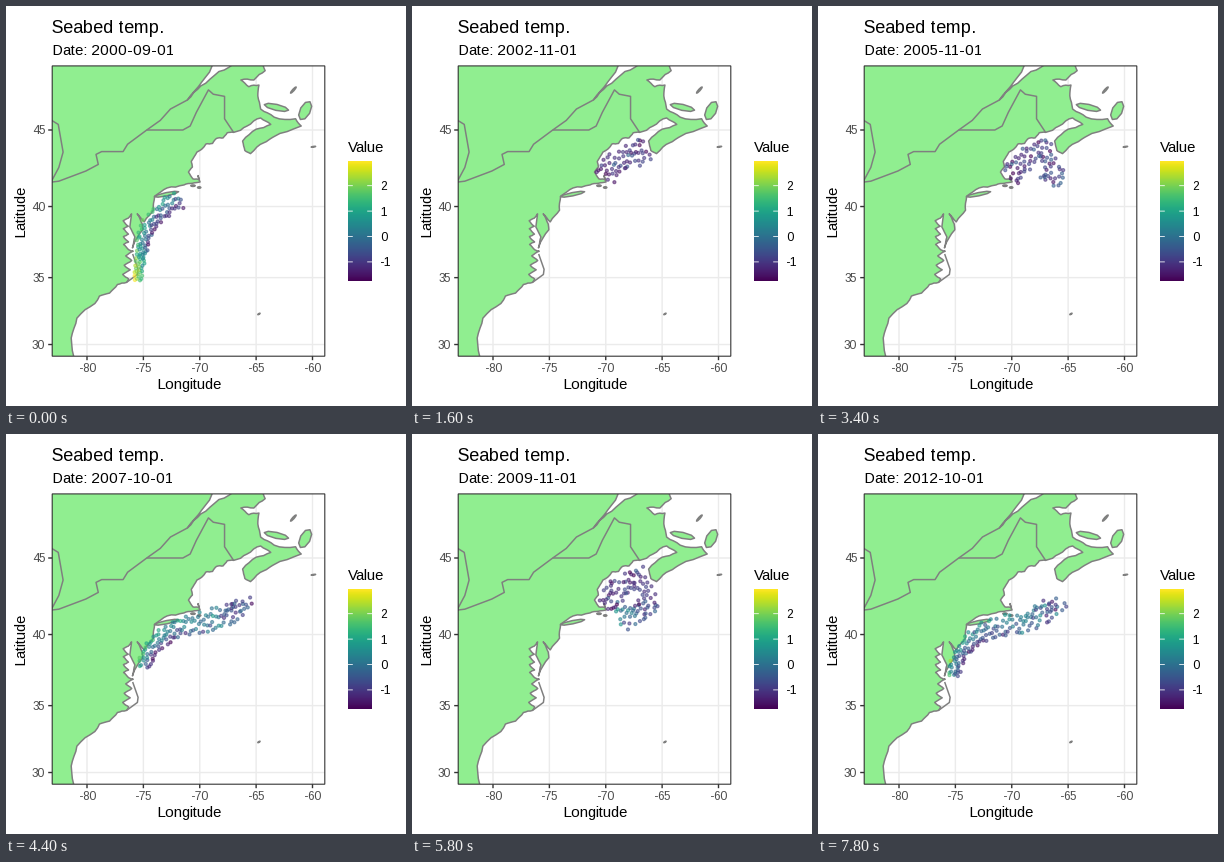
These frames come from a looping animation (400x400 px, 8000 ms). A matplotlib script:

```python
import math

import matplotlib.pyplot as plt
import numpy as np
from matplotlib.animation import FuncAnimation
from matplotlib.patches import Polygon, Rectangle

SIZE, DPI = 400, 100
PX = 72 / DPI                      # one pixel in points
LEFT, TOP, RIGHT, BOTTOM = 46.2, 59.9, 318.8, 350.2
SCALE = 11.275                     # pixels per degree of longitude
V_MIN, V_MAX = -1.75, 2.98
GREY = "#7f7f7f"

# Whole-pixel letter advances
plt.rcParams.update({"font.family": "Liberation Sans",
                     "text.hinting_factor": 1})
viridis = plt.get_cmap("viridis")


# ---------------------------------------------------------------- geometry
def merc(lat):
    return math.degrees(math.log(math.tan(math.pi / 4 + math.radians(lat) / 2)))


def project(points):
    return [(81 + (lon + 80) * SCALE, 124 - (merc(lat) - merc(45)) * SCALE)
            for lon, lat in points]


def inlets(start, end, n, dx, dy):
    """Shore from start to end with n bays cut in by (dx, dy)."""
    t = np.linspace(0, 1, 2 * n + 1)[:, None]
    shore = np.array(start) * (1 - t) + np.array(end) * t
    shore[1::2] += (dx, dy)
    return [tuple(p) for p in shore]


def rough(points, amount=0.06, passes=2):
    """Shift segment midpoints sideways for a natural shoreline."""
    rng = np.random.default_rng(4)
    for _ in range(passes):
        out = [points[0]]
        for (x0, y0), (x1, y1) in zip(points, points[1:]):
            k = rng.uniform(-amount, amount)
            out.append(((x0 + x1) / 2 - k * (y1 - y0),
                        (y0 + y1) / 2 + k * (x1 - x0)))
            out.append((x1, y1))
        points = out
    return points


def island(lon, lat, length, width, tilt):
    """Tapered island, tilted counter-clockwise in degrees."""
    a = np.linspace(0, 2 * math.pi, 9)[:-1]
    u, v = length / 2 * np.cos(a), width / 2 * np.sin(a)
    c, s = math.cos(math.radians(tilt)), math.sin(math.radians(tilt))
    return list(zip(lon + u * c - v * s, lat + (u * s + v * c) * 0.74))


coast = rough(
    [(-81, 28.6), (-81.4, 30.5), (-80.9, 32), (-79.3, 33.1), (-78.9, 33.65),
     (-78, 33.87), (-77.3, 34.5), (-76.5, 34.65)]
    + inlets((-76.3, 34.9), (-75.9, 36.9), 3, -0.6, 0)
    + inlets((-76.3, 37), (-76.35, 39.2), 4, -0.45, 0.1)
    + [(-76.05, 39.5), (-76.2, 38.6), (-75.75, 37.9), (-75.97, 37.13),
       (-75.05, 38.4), (-75.1, 38.8), (-75.55, 39.5), (-74.92, 38.95),
       (-74.1, 39.75), (-74, 40.7), (-72.9, 41.25), (-71.4, 41.45),
       (-70.65, 41.56), (-69.97, 41.65), (-70.15, 42.07), (-70.05, 41.8),
       (-70.6, 41.85), (-71, 42.3), (-70.65, 42.63), (-70.75, 43),
       (-70.25, 43.6)]
    + inlets((-69.8, 43.8), (-67, 44.85), 3, -0.1, 0.15)
    + [(-65.8, 45.25), (-64.6, 45.75), (-63.7, 45.35), (-65, 45.05),
       (-66.2, 44.3), (-66, 43.7), (-65.5, 43.5), (-64.3, 44.2),
       (-63.5, 44.55), (-61, 45.25), (-61.5, 45.7), (-63.4, 45.8),
       (-64.6, 46.3), (-64.85, 47.1), (-64.75, 47.75), (-65.65, 47.65),
       (-66.35, 48.05), (-65.2, 48.05), (-64.2, 48.6), (-64.6, 49.2),
       (-66.5, 49.2), (-68.3, 48.55), (-69.9, 47.7), (-71.1, 46.85),
       (-69.8, 47.95), (-68.6, 49.2)])
mainland = coast + [(-85, 49.5), (-85, 28.5)]

islands = [
    island(-72.95, 40.83, 2.2, 0.3, 12),
    island(-70.6, 41.4, 0.4, 0.14, 0),
    island(-70.05, 41.28, 0.3, 0.14, 0),
    island(-63.2, 46.4, 2.2, 0.5, -12),
    island(-60.65, 46.2, 1.7, 0.9, 60),
    island(-61.7, 47.45, 0.7, 0.14, 45),
    island(-59.92, 43.94, 0.4, 0.06, 8),
    island(-64.75, 32.32, 0.25, 0.08, 35),
]

lines = [
    # border along the lakes and on to the sea
    [(-83.6, 41.6), (-82.5, 41.7), (-80.1, 42.37), (-79, 42.8), (-79.2, 43.45),
     (-78.7, 43.63), (-76.8, 43.63), (-76.4, 44.1), (-74.7, 45), (-71.5, 45),
     (-70.85, 45.25), (-70.3, 46.1), (-69.23, 47.46), (-68.8, 47.2),
     (-67.8, 47.07), (-67.8, 45.7), (-67, 44.85)],
    [(-83.6, 45.8), (-82.55, 45.35), (-82.12, 43.6), (-82.5, 42.6),
     (-83.15, 41.7)],
    # river
    [(-74.7, 45), (-73.5, 45.6), (-72.6, 46.3), (-71.1, 46.85)],
    # barrier islands
    [(-76.5, 34.65), (-75.53, 35.23), (-75.47, 35.6), (-75.95, 36.7)],
]

# ---------------------------------------------------------------- stations
# Cruise track in pixels: up the shelf, round the bank, into the gulf.
TRACK = np.array([(131, 275), (135, 254), (136, 237), (143, 218), (157, 203),
                  (175, 193), (200, 188), (222, 182), (238, 170),
                  (226, 142), (205, 155), (192, 172)], float)
NODES = np.arange(len(TRACK))
TANGENT = np.gradient(TRACK, axis=0)
NORMAL = np.column_stack([-TANGENT[:, 1], TANGENT[:, 0]])
NORMAL /= np.hypot(*NORMAL.T)[:, None]


def along(table, s):
    return np.column_stack([np.interp(s, NODES, col) for col in table.T])


def leg(year, month):
    """Part of the track covered in a month; later years run ahead less."""
    start, end = {9: (0, 5), 10: (3, 8.2), 11: (7.6, 11), 12: (9.8, 11)}[month]
    if start:
        start += 0.33 * np.clip(2004.5 - year, -4, 4)
    return start, end


def survey(year, month):
    """Positions and RGBA colours of one month's stations."""
    rng = np.random.default_rng(year * 100 + month)
    start, end = leg(year, month)
    n = int(23 * (end - start))
    s = start + (end - start) * (np.arange(n) + rng.random(n)) / n
    t = (np.arange(n) * 0.618 + rng.uniform(0, 0.3, n)) % 1 * 2 - 1
    width = np.minimum(4 + 1.3 * s, 12)
    spots = along(TRACK, s) + along(NORMAL, s) * (t * width)[:, None]
    # warm in the south and inshore, cold to the north and offshore
    value = (2.6 * np.exp(-s / 1.2) - 0.11 * s
             + 0.7 * np.exp(-(s - 6) ** 2 / 2)
             - 1.5 * t * np.exp(-(s - 3) ** 2 / 8)
             + rng.normal(0, 0.4, n))
    colors = viridis(np.clip((value - V_MIN) / (V_MAX - V_MIN), 0, 1))
    colors[:, 3] = 0.55
    return spots, colors


def months(year):
    return range(9, 13 if year in (2009, 2010) else 12)


DATES = [(y, m) for y in range(2000, 2013) for m in months(y)][:40]
CLOUDS = [survey(*date) for date in DATES]

# ---------------------------------------------------------------- drawing
fig = plt.figure(figsize=(SIZE / DPI, SIZE / DPI), dpi=DPI, facecolor="white")
ax = fig.add_axes([0, 0, 1, 1])
ax.axis("off")

panel = Rectangle((LEFT, TOP), RIGHT - LEFT, BOTTOM - TOP, fill=False,
                  ec="#333333", lw=1.1 * PX, snap=False, zorder=6)
ax.add_patch(panel)


def line(xs, ys, color, width, z):
    return ax.plot(xs, ys, color=color, lw=width * PX, zorder=z, snap=False,
                   solid_capstyle="butt", solid_joinstyle="round")[0]


def label(x, y, text, size=11, color="black", **kw):
    return ax.text(x, y, text, fontsize=size, color=color, va="baseline", **kw)


for lon in range(-80, -59, 5):
    x = 81 + (lon + 80) * SCALE
    line([x, x], [TOP, BOTTOM], "#ebebeb", 1.4, 1)
    line([x, x], [BOTTOM, BOTTOM + 4], "#333333", 1.4, 5)
    label(x, 366, str(lon), 8.8, "#4d4d4d", ha="center")

for lat in range(30, 46, 5):
    y = project([(0, lat)])[0][1]
    line([LEFT, RIGHT], [y, y], "#ebebeb", 1.4, 1)
    line([LEFT - 4, LEFT], [y, y], "#333333", 1.4, 5)
    label(39, y + 4.5, str(lat), 8.8, "#4d4d4d", ha="right")

for shape in [mainland] + islands:
    land = Polygon(project(shape), closed=True, fc="lightgreen", ec=GREY,
                   lw=1.5 * PX, joinstyle="round", zorder=2)
    ax.add_patch(land)
    land.set_clip_path(panel)

for path in lines:
    xs, ys = zip(*project(path))
    line(xs, ys, GREY, 1.5, 3).set_clip_path(panel)

label(46, 27, "Seabed temp.", 13.2)
date_text = label(46, 49, "")
label(182.5, 383, "Longitude", ha="center")
label(18.5, 205, "Latitude", rotation=90, rotation_mode="anchor", ha="center")

# colour bar
label(342, 146, "Value")
ax.imshow(np.linspace(1, 0, 256)[:, None], cmap=viridis, aspect="auto",
          extent=(342, 366, 275, 155), zorder=2)
for v in range(-1, 3):
    y = 230.5 - 25.4 * v
    for x in (342, 361.2):
        line([x, x + 4.8], [y, y], "white", 0.8, 3)
    label(374, y + 4.5, str(v), 8.8)

ax.set_xlim(0, SIZE)
ax.set_ylim(SIZE, 0)
dots = ax.scatter([], [], s=(3.1 * PX) ** 2, linewidths=1.1 * PX, zorder=4)


def update(i):
    spots, colors = CLOUDS[i]
    dots.set_offsets(spots)
    dots.set_facecolors(colors)
    dots.set_edgecolors(colors)
    date_text.set_text("Date: %d-%02d-01" % DATES[i])
    return dots, date_text


anim = FuncAnimation(fig, update, frames=len(DATES), interval=200,
                     init_func=lambda: update(0), repeat=True, repeat_delay=0)
plt.show()
```
